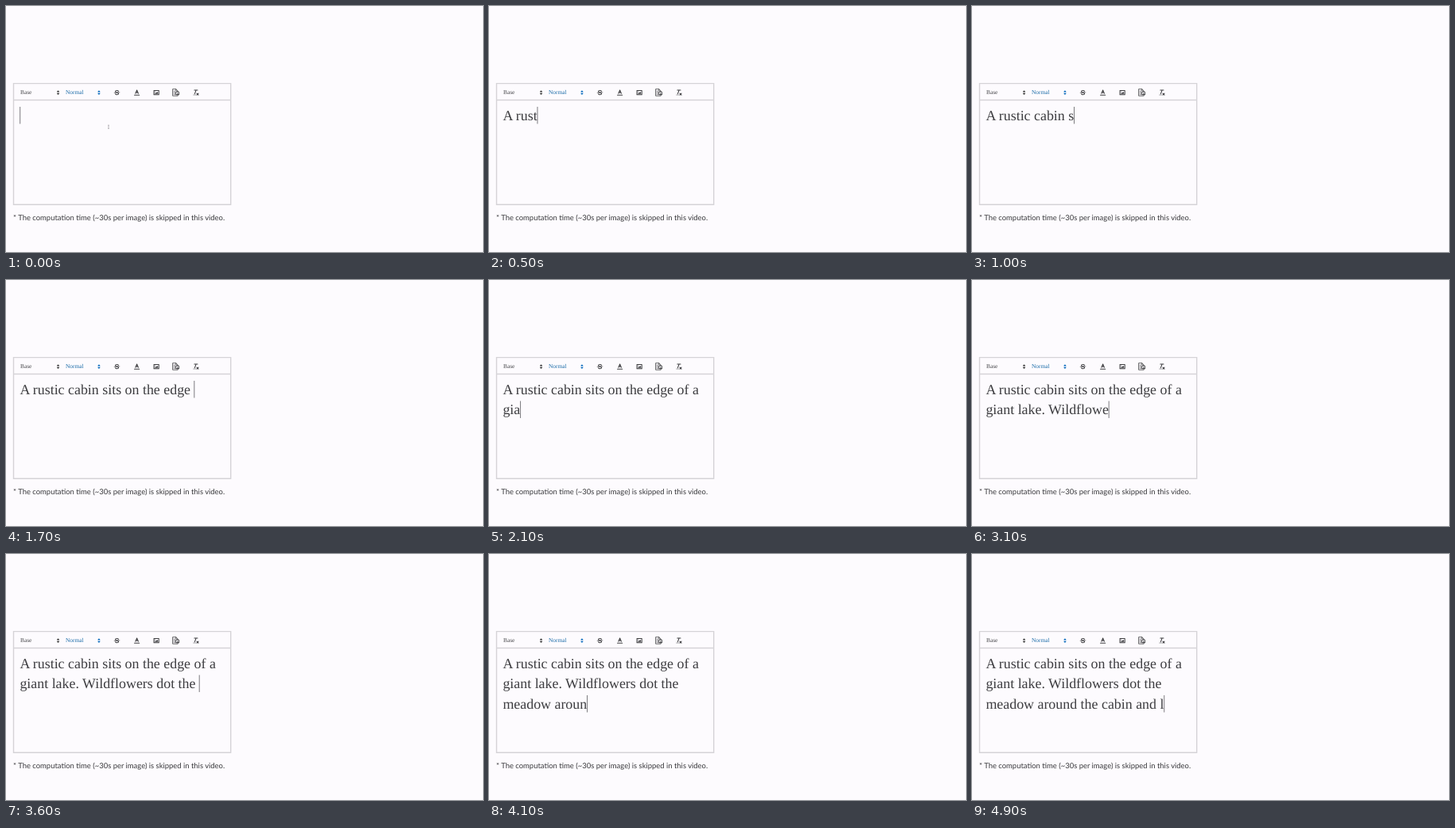
These frames come from a looping animation (600 by 310 pixels, 5 s). An HTML page:

```html
<!DOCTYPE html>
<html lang="en">
<head>
<meta charset="utf-8">
<title>Typing into an editor</title>
<style>
  html, body { margin: 0; width: 100%; height: 100%; overflow: hidden; background: #fdfbfe; }
  svg { display: block; width: 600px; height: 310px; }
  text { white-space: pre; font-kerning: normal; text-rendering: geometricPrecision; }
  .line { font: 17.9px "Liberation Serif", "Times New Roman", serif; fill: #3d3d40; }
  .label { font: 7.4px "Liberation Serif", "Times New Roman", serif; fill: #4a4a4d; }
  .note { font: 9.45px Lato, sans-serif; fill: #38383b; }
  .icon { fill: none; stroke: #3f3f42; stroke-width: 2; stroke-linecap: round; stroke-linejoin: round; }
  .icon .solid { fill: #3f3f42; stroke: none; }
  .thin { stroke-width: 1.2; }
  .frame { fill: none; stroke: #d5d3d7; stroke-width: 1.4; }
</style>
</head>
<body>
<svg viewBox="0 0 600 310" xmlns="http://www.w3.org/2000/svg">
  <defs>
    <g id="arrows" stroke-width="2" stroke-linejoin="round">
      <path d="M7 11L9 13L11 11ZM7 7L9 5L11 7Z"/>
    </g>
  </defs>
  <rect width="600" height="310" fill="#fdfbfe"/>
  <path class="frame" d="M9.5 97.6H282.7V250.2H9.5ZM9.5 118.5H282.7"/>

  <text class="label" x="18" y="111.4">Base</text>
  <text class="label" x="75" y="111.4" style="fill:#1b6ca8">Normal</text>
  <use href="#arrows" transform="translate(60.9 104.5) scale(.515)" fill="#333" stroke="#333"/>
  <use href="#arrows" transform="translate(112.3 104.5) scale(.515)" fill="#06b" stroke="#06b"/>

  <g class="icon" transform="translate(134.9 104.5) scale(.515)">
    <path d="M12.9 6C12.4 4.8 10.8 4 9 4C6.8 4 5 5 5 6.5C5 8 6.5 8.7 9 9C11.5 9.3 13 10 13 11.5C13 13 11.2 14 9 14C7.2 14 5.6 13.2 5.1 12"/>
    <path class="thin" d="M2.5 9.5L15.5 8.5"/>
  </g>
  <g class="icon" transform="translate(160 104.5) scale(.515)">
    <path d="M3 15H15M5.5 11L9 3L12.5 11M6.4 9H11.6"/>
  </g>
  <g class="icon" transform="translate(184.5 104.5) scale(.515)">
    <rect x="3" y="4" width="12" height="10"/>
    <circle class="solid" cx="6" cy="7" r="1"/>
    <path class="solid" d="M5 12V11L7 9L8 10L11 7L13 9V12Z"/>
  </g>
  <g class="icon" style="stroke-width:.8">
    <path d="M216.2 112.4V113.2H209.6V104.7H213.8L216.2 107V108M213.7 104.8V107.1H216"/>
    <path d="M211 107.2H212.4M211 109.2H213M211 111.2H213" stroke-width=".7"/>
    <rect x="213.9" y="108.4" width="3.8" height="3.4"/>
    <path class="solid" d="M214 111.7L215.3 110L216.2 110.8L217 109.8L217.7 111.7Z"/>
  </g>
  <g class="icon" transform="translate(234.3 104.5) scale(.515)">
    <path d="M5 3H13M6 12L9.35 3M11 11L15 15M15 11L11 15"/>
    <rect class="solid" x="2" y="14" width="7" height="1.2" rx=".5"/>
  </g>

  <text class="line" x="17.4" y="143.9"></text>
  <text class="line" x="17.4" y="169.4"></text>
  <text class="line" x="17.4" y="194.9"></text>
  <rect id="caret" width="1" height="21.5" fill="#7c7b7f"/>
  <path id="pointer" d="M128.2 150.2H129.8M129 150.2V154.5M128.2 154.5H129.8" fill="none" stroke="#a5a3a8" stroke-width=".8"/>

  <text class="note" x="9" y="269.6">* The computation time (~30s per image) is skipped in this video.</text>
</svg>
<script>
  const LOOP = 5000, STEP = 100, LEFT = 17.4;
  const story = "A rustic cabin sits on the edge of a giant lake. Wildflowers dot the meadow around the cabin and l";
  // [time in ms, characters typed]
  const pace = [[200, 0], [1000, 16], [1400, 25], [1700, 32], [1900, 37], [2000, 38], [2100, 40],
    [2600, 51], [3100, 58], [3200, 60], [3700, 72], [3800, 75], [4100, 81], [4400, 87], [4900, 98]];
  // Each wrap starts a line at `at` once `from` characters no longer fit above.
  const wraps = [{ at: 37, from: 38 }, { at: 69, from: 73 }];

  const lines = [...document.querySelectorAll(".line")];
  const caret = document.getElementById("caret");
  const pointer = document.getElementById("pointer");

  function typedAt(t) {
    if (t <= pace[0][0]) return 0;
    for (let i = 1; i < pace.length; i++) {
      const [t0, n0] = pace[i - 1], [t1, n1] = pace[i];
      if (t <= t1) return Math.floor(n0 + (n1 - n0) * (t - t0) / (t1 - t0) + 1e-6);
    }
    return story.length;
  }

  function draw(t) {
    const n = typedAt(t);
    const starts = [0, ...wraps.filter(w => n >= w.from).map(w => w.at)];
    const row = starts.length - 1;
    lines.forEach((line, i) => {
      const end = i < row ? starts[i + 1] : n;
      line.textContent = i <= row ? story.slice(starts[i], end) : "";
    });
    const width = n ? lines[row].getComputedTextLength() : 0;
    caret.setAttribute("x", LEFT + width - 0.2);
    caret.setAttribute("y", 127 + 25.5 * row);
    caret.style.display = t >= 100 && t < 300 ? "none" : "";
    pointer.style.display = t < 300 ? "" : "none";
  }

  let origin = null;
  function tick(now) {
    if (origin === null) origin = now;
    draw(Math.floor(((now - origin) % LOOP) / STEP) * STEP);
    requestAnimationFrame(tick);
  }
  draw(0);
  requestAnimationFrame(tick);
</script>
</body>
</html>
```
